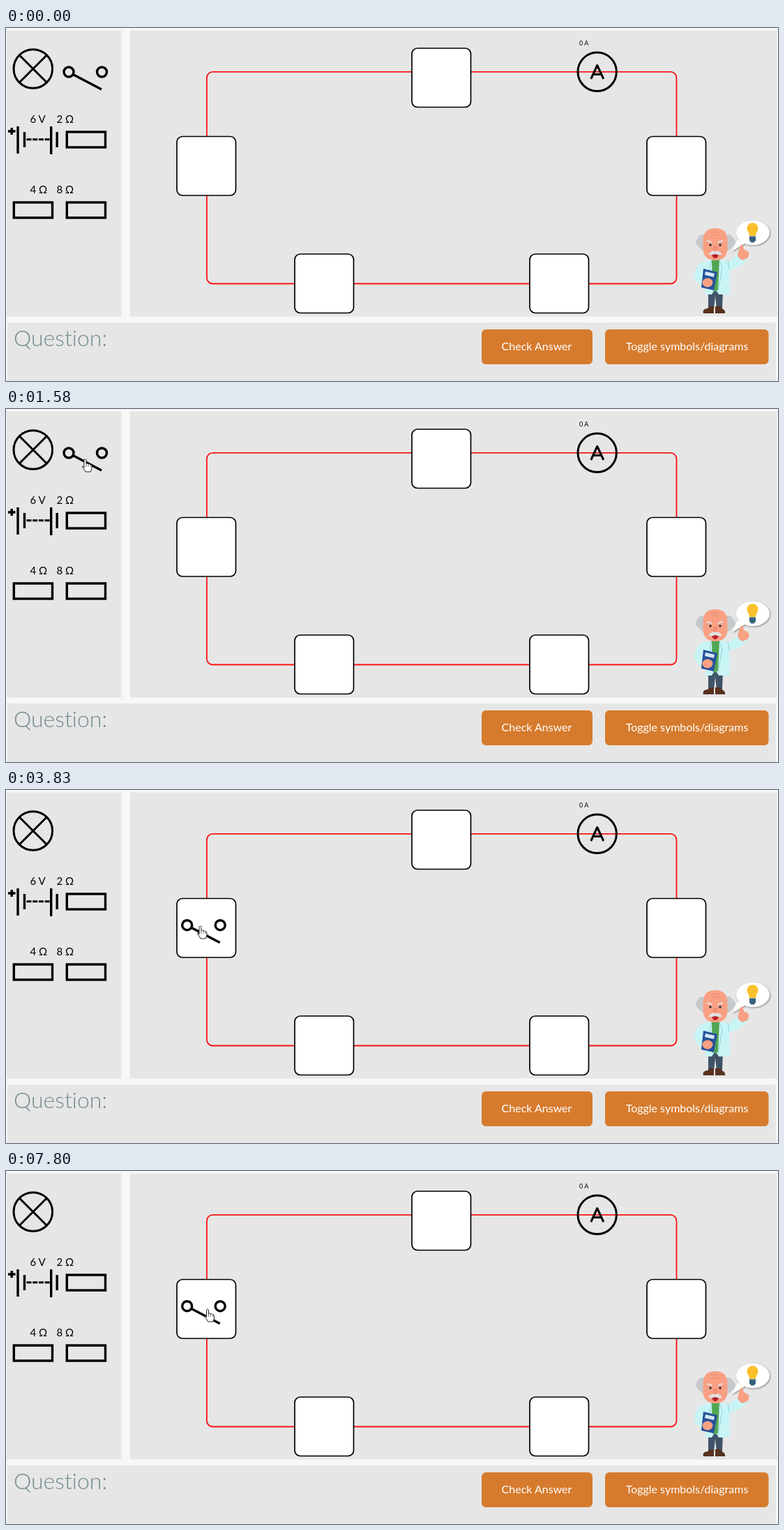
Recreate the animation shown at these times as an HTML page. Size 1107 px wide and 506 px high, loop 8000 ms.

```html
<!DOCTYPE html>
<html lang="en">
<head>
<meta charset="utf-8">
<title>Circuit builder</title>
<style>
html, body { margin: 0; width: 100%; height: 100%; overflow: hidden; background: #f7f7f7; }
svg { display: block; }
text { font-family: Nunito, Lato, Carlito, sans-serif; font-variant-ligatures: none; }
.ink { fill: none; stroke: #000; stroke-width: 3.4; }
.thin { stroke-width: 3; }
.label { font-size: 15px; }
.small { font-size: 9px; }
.button { font-size: 16px; fill: #fff; text-anchor: middle; }
</style>
</head>
<body>
<svg width="1107" height="506" viewBox="0 0 1107 506">
  <g fill="#e6e6e6">
    <rect x="1" y="3.500" width="164.500" height="410"/>
    <rect x="178" y="3.500" width="927.500" height="410"/>
    <rect x="2" y="422" width="1102" height="84"/>
  </g>

  <rect x="287.900" y="62.900" width="673.600" height="303.600" rx="8.500" fill="none" stroke="#fa1414" stroke-width="1.800"/>
  <g id="slots" fill="#fff" stroke="#000" stroke-width="1.700"></g>

  <g class="ink">
    <g class="thin">
      <circle cx="38.800" cy="58.500" r="27.800"/>
      <path d="M19.300 39l39 39m0-39l-39 39"/>
      <path d="M29.500 159.800h34" stroke-dasharray="7 1.700"/>
      <circle cx="847.700" cy="62.800" r="27.700"/>
      <path d="M838.800 73l9-19.500 9 19.500M842 66.500h11.500" stroke-linejoin="round"/>
    </g>
    <path d="M3 148h10.500M8.200 143v10"/>
    <path d="M17 141v39M64.700 141v40M26.500 149v22M73.200 149v22"/>
    <rect x="87.300" y="149" width="55.200" height="22"/>
    <rect x="11.300" y="250" width="55.200" height="22"/>
    <rect x="87.300" y="250" width="55.200" height="22"/>
  </g>
  <g class="label">
    <text x="34.500" y="135.500">6 V</text>
    <text x="72.500" y="135.500">2 Ω</text>
    <text x="34.500" y="236.500">4 Ω</text>
    <text x="72.500" y="236.500">8 Ω</text>
    <text class="small" x="822" y="24.500">0 A</text>
  </g>

  <text x="11" y="455.500" font-size="32" font-weight="300" fill="#71898f">Question:</text>
  <g fill="#d67b2d">
    <rect x="682" y="432" width="159" height="50" rx="6"/>
    <rect x="859" y="432" width="234.500" height="50" rx="6"/>
  </g>
  <text class="button" x="761" y="462">Check Answer</text>
  <text class="button" x="976.500" y="462">Toggle symbols/diagrams</text>

  <!-- thought bubble -->
  <g id="bubble">
    <path d="M1049 303L1041 320L1061 308Z" fill="#fff"/>
    <ellipse cx="1071" cy="293.500" rx="24" ry="17.800" fill="#fff"/>
  </g>
  <path d="M1066 298q0-4-2.500-7a8 8 0 1 1 14 0q-2.500 3-2.500 7z" fill="#fbc02d"/>
  <path d="M1066 298.500h9v6l-2.500 3h-4l-2.500-3z" fill="#34617f"/>

  <!-- professor -->
  <g>
    <path d="M1007 376h21l-1 27h-8l-2-19-2 19h-8z" fill="#405368"/>
    <path d="M1000 409q-2-6 6-7l3-3h6v10zm17 0v-10h8l1 3q6 2 5 7z" fill="#57321f"/>
    <path d="M1000 335l12-3h13l11 3 18-15 10 10q-9 13-27 17l1 35h-16l-5-8-5 8h-10l2-12q-12-1-17-12 0-18 13-23z" fill="#c9f4f5"/>
    <path d="M1012 332h11l-2 43-4 3-4-3z" fill="#52a653"/>
    <path d="M1012 333l-3 10 5 36m9-46 4 11-6 34m16-32-2-13" fill="none" stroke="#93d3d8"/>
    <path d="M1000 345l20 5-5 26-18-4z" fill="#265299"/>
    <path d="M1003 349l13 3-1 5-13-3z" fill="#d6e7f5"/>
    <ellipse cx="1006" cy="365" rx="7.500" ry="6.500" fill="#f9a083"/>
    <path d="M1051 318l2-6 3-2 2 7 6 3q3 5-1 10l-7 3q-5-2-7-7z" fill="#f9a083"/>

    <g stroke="#c6c9cc" stroke-width="12" stroke-linecap="round" stroke-linejoin="round" fill="none">
      <path d="M998 302l-3 5 6 6M1036 302l4 5-6 6"/>
    </g>
    <path d="M999.500 305q0-18 17.500-18t17.500 18v13q-2 15-17.500 15t-17.500-15z" fill="#f9a083"/>
    <path d="M1011 293q6-2 12 0m-11 4q5-2 10 0" fill="none" stroke="#e68e74"/>
    <path d="M1005 305l7 2m9 0 7-2" stroke="#dfe1e2" stroke-width="2"/>
    <circle cx="1010" cy="311" r="1.800" fill="#263342"/>
    <circle cx="1024" cy="311" r="1.800" fill="#263342"/>
    <path d="M1012 324h10q-1 6-5 6t-5-6z" fill="#b8232d"/>
    <path d="M1007 325q3-6 10-6 7 0 10 6-5 1-10-1-5 2-10 1z" fill="#dfe1e2"/>
    <ellipse cx="1017" cy="316" rx="3.500" ry="4" fill="#f18f77"/>
  </g>

  <g id="switch" class="ink">
    <circle r="7"/>
    <circle cx="47.500" r="7"/>
    <path id="lever"/>
  </g>
  <g id="pointer">
    <circle id="glow" cx="-2.500" cy="-6" r="11.500" fill="#ffee08"/>
    <path d="M-4 3V-7.300Q-4-9-2.500-9T-1-7.300V-2.500Q1-4 2-1.800 4-3 5-1 7-1.500 7 1V4Q6.500 6 5.500 9H-2L-3.500 6-6.500 2.500Q-7 .500-5 1Z" fill="#fff" stroke="#222" stroke-linejoin="round"/>
    <path d="M-1-2v4m3-3.500V2m3-2.500V2" stroke="#555" stroke-width=".8"/>
  </g>
</svg>
<script>
const LOOP = 8000, START = 329, STEP = 68.45; // the screen refreshes once per step
const $ = id => document.getElementById(id);
const clamp = v => Math.min(1, Math.max(0, v));

$('bubble').style.filter = 'drop-shadow(1px 1.5px 1px #888)';
$('slots').innerHTML = [[582, 29], [245, 155.5], [919, 155.5], [414, 324], [751, 324]]
  .map(([x, y]) => `<rect x="${x}" y="${y}" width="84.5" height="84.5" rx="8"/>`).join('');

// Straight moves one after another, each from one step to a later one.
const glide = (start, moves) => k => moves.reduce(([x, y], { from, to, at }) => {
  const u = clamp((k - from) / (to - from));
  return [x + (at[0] - x) * u, y + (at[1] - y) * u];
}, start);

const pointerAt = glide([870, 480], [
  { from: 0, to: 7, at: [509, 266] },
  { from: 7, to: 11, at: [234, 127] },
  { from: 11, to: 18, at: [116, 81] },
  { from: 22, to: 25, at: [102, 67] },
  { from: 28, to: 32, at: [228, 111] },
  { from: 32, to: 40, at: [281, 204] },
  { from: 73, to: 74, at: [288, 207] },
  { from: 107, to: 109, at: [291.5, 207] }
]);
const switchAt = glide([90, 63], [
  { from: 28, to: 32, at: [198, 90] },
  { from: 32, to: 40, at: [259.7, 193.7] }
]);

// Pointer glow while pressed, then a three-step fade.
const press = (k, down, up) => k < down ? 0 : clamp((up + 3 - k) / 3);
const DRAG = 28, DROP = 48, CLOSE = 59, OPEN = 88, CLICK = 2;

const place = (id, point) => $(id).setAttribute('transform', `translate(${point})`);

function draw(now) {
  const k = Math.floor((now % LOOP - START) / STEP);
  const closed = k >= CLOSE + CLICK && k < OPEN + CLICK;
  const glow = Math.max(press(k, DRAG, DROP), press(k, CLOSE, CLOSE + CLICK), press(k, OPEN, OPEN + CLICK));
  place('switch', switchAt(k));
  place('pointer', pointerAt(k));
  $('pointer').setAttribute('visibility', k < 0 ? 'hidden' : 'visible');
  $('glow').setAttribute('opacity', 0.75 * glow);
  $('lever').setAttribute('d', closed ? 'M6 5L42-5.5' : 'M6 3.5L47 25');
  requestAnimationFrame(draw);
}
draw(0);
</script>
</body>
</html>
```
